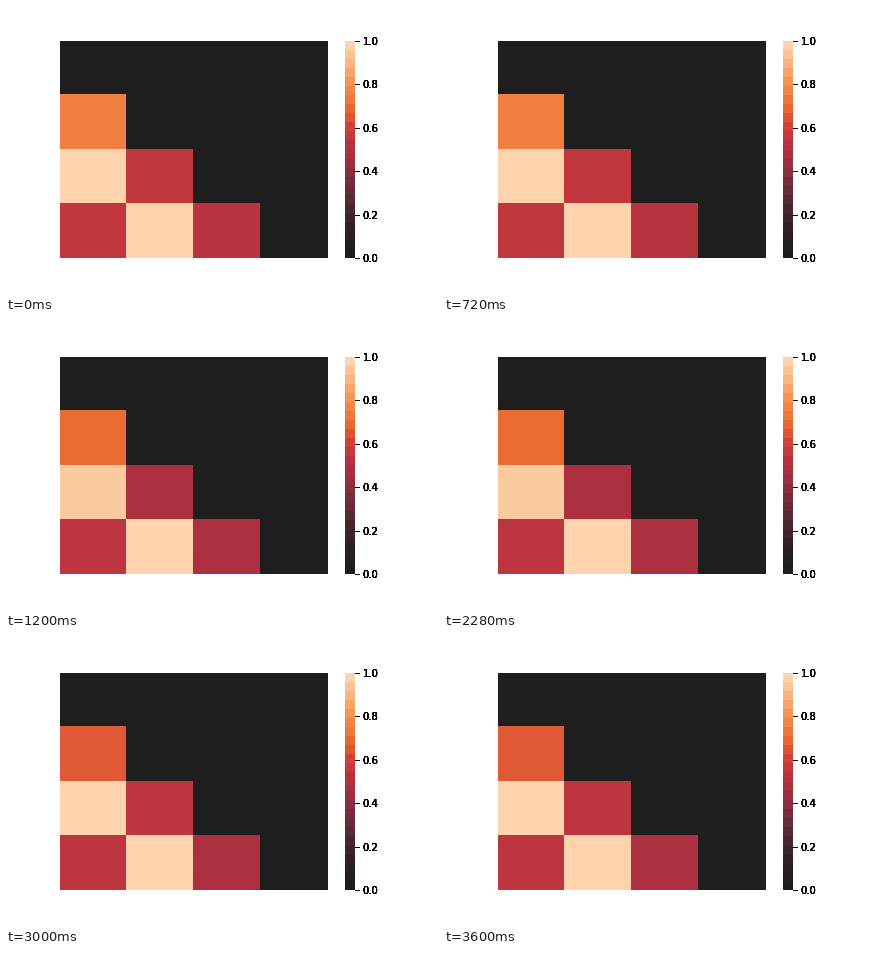
Recreate the animation shown at these times as a matplotlib script. Size 432x288 px, loop 4000 ms.

```python
import numpy as np
import matplotlib.pyplot as plt
from matplotlib.animation import FuncAnimation
from matplotlib.colors import LinearSegmentedColormap, to_rgb

W, H, DPI = 432, 288, 72
STEP_MS, FRAMES = 200, 20

plt.rcParams.update({"font.family": "DejaVu Sans", "font.size": 10})

DARK, PEACH = "#1f1e1e", "#ffd3ac"
FIRE = LinearSegmentedColormap.from_list("fire", [
    DARK, "#2a2023", "#41252d", "#642b38", "#8b2e42", "#af3041",
    "#cd3f38", "#e86a31", "#f18b4a", "#f9af79", PEACH])

# Start time and lower-triangle colours, row by row
STATES = [
    (0, ["#f07f40", PEACH, "#c0373d", "#c0373d", PEACH, "#ba343f"]),
    (1200, ["#e96c33", "#fbca9e", "#ad3040", "#bc353f", PEACH, "#ad3040"]),
    (3000, ["#df5934", PEACH, "#bc353f", "#bc353f", PEACH, "#ad3040"]),
]
X_EDGES = [54, 120, 187, 254, 322]
Y_EDGES = [35, 88, 143, 197, 252]
BAR_LEVELS = 24


def grid(colors):
    cells = np.full((4, 4, 3), to_rgb(DARK))
    cells[np.tril_indices(4, -1)] = [to_rgb(c) for c in colors]
    return cells


fig = plt.figure(figsize=(W / DPI, H / DPI), dpi=DPI, facecolor="white")
ax = fig.add_axes([0, 0, 1, 1])
ax.axis("off")

mesh = ax.pcolormesh(X_EDGES, Y_EDGES, grid(STATES[0][1]))

bar_y = np.round(np.linspace(252, 35, BAR_LEVELS + 1))
bar = FIRE(np.linspace(0, 1, BAR_LEVELS))[:, None, :3]
ax.pcolormesh([339, 349], bar_y, bar)
ax.set(xlim=(0, W), ylim=(H, 0))

# Stacked copies of the scale give its labels their heavy edges
for i in range(6):
    scale = fig.add_axes([338.58 / W, 0.125, 10.87 / W, 0.755], label=f"scale{i}")
    scale.patch.set_visible(False)
    for spine in scale.spines.values():
        spine.set_visible(False)
    scale.set_xticks([])
    scale.yaxis.tick_right()
    scale.set_ylim(0, 1)
    scale.set_yticks(np.linspace(0, 1, 6))


def update(frame):
    now = frame * STEP_MS
    colors = [c for start, c in STATES if start <= now][-1]
    mesh.set_array(grid(colors))
    return [mesh]


anim = FuncAnimation(fig, update, frames=FRAMES, interval=STEP_MS,
                     repeat=True, repeat_delay=0, blit=False)
plt.show()
```
